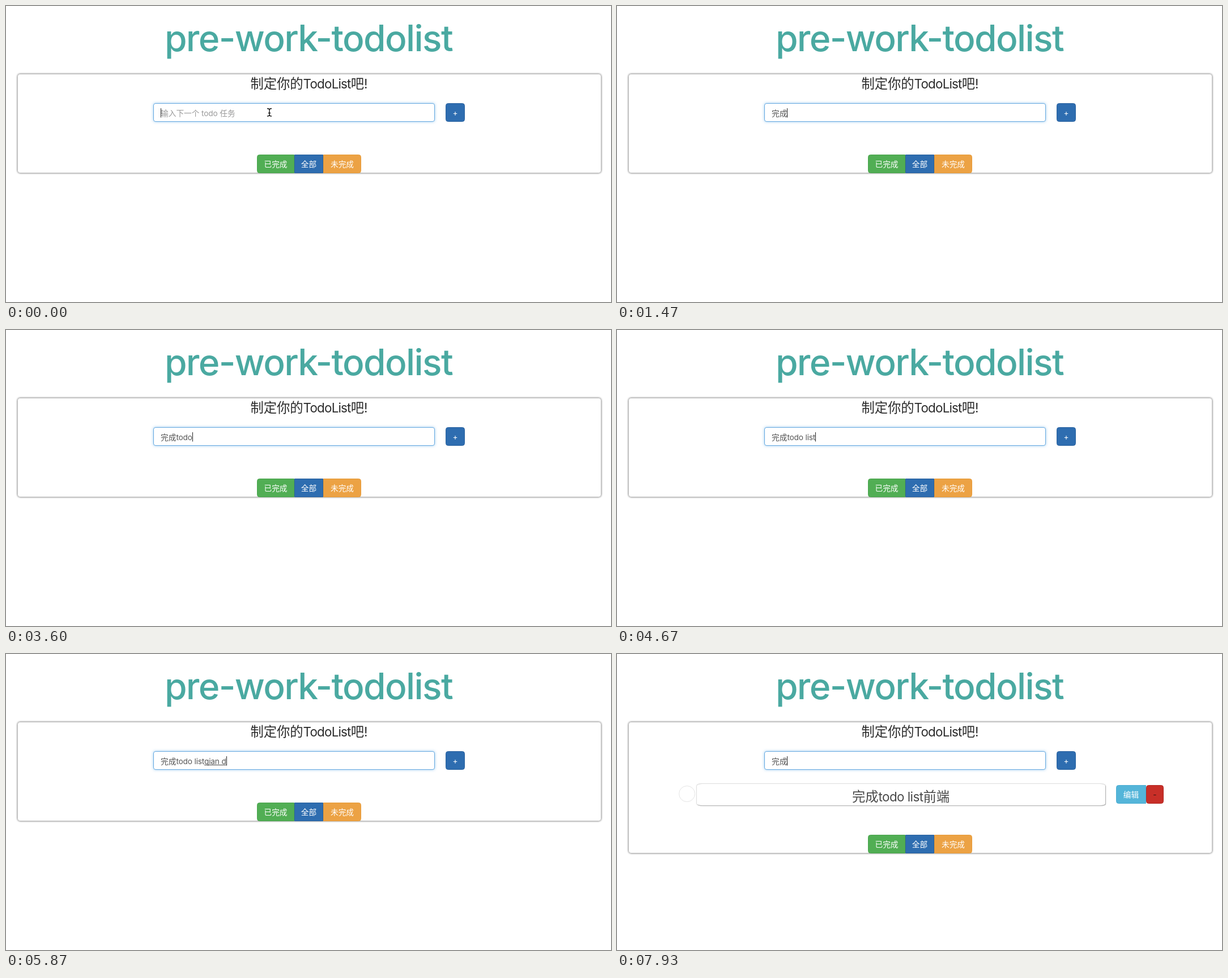
An HTML page that plays this animation: 1068x524 px, repeating every 8000 ms.

```html
<!DOCTYPE html>
<html lang="zh-CN">
<head>
<meta charset="utf-8">
<title>todolist</title>
<style>
html, body { margin: 0; width: 100%; height: 100%; overflow: hidden; background: #fff; }
#stage { position: absolute; left: 0; top: 0; width: 1068px; height: 524px; overflow: hidden; }
#stage div, svg { position: absolute; box-sizing: border-box; }
svg { left: 0; top: 0; }
text {
  font-family: Inter, "Noto Sans CJK SC", "Noto Sans CJK", sans-serif;
  font-size: 13.7px; font-optical-sizing: none; white-space: pre;
}
.latin { letter-spacing: -.013em; }
.mid { text-anchor: middle; }
.title { font-size: 64px; font-weight: 500; fill: #4aa9a1; letter-spacing: -.025em; }
.big { font-size: 23.3px; fill: #2b2b2b; }
.big .latin { font-size: 22.4px; letter-spacing: -.036em; }
.item { fill: #484848; }
.item .latin { letter-spacing: -.025em; }
.num { font-size: 11px; fill: #777; }
.cand { font-size: 16px; fill: #000; }
#panel {
  left: 19.5px; top: 120px; width: 1031px; border-radius: 5px;
  border: 1px solid #c0c0c0; box-shadow: 0 0 3px #666;
}
#input {
  left: 260px; top: 172px; width: 497px; height: 33px; border: 1px solid #66a9e0;
  border-radius: 4px; background: #fff; box-shadow: 0 0 5px rgba(102,175,233,.6);
}
#box {
  left: 141px; top: 230px; width: 721px; height: 38px; border-radius: 9px / 3px;
  box-shadow: 0 0 2px #888, 1px 1px 1px #bbb;
}
#tick { left: 109px; top: 233px; width: 29px; height: 29px; border: 1px solid #e4e4e4; border-radius: 50%; }
#pop {
  left: 0; top: 203px; width: 380px; height: 27px; border-radius: 4px; background: #fff;
  box-shadow: 0 0 1px rgba(0,0,0,.5), 0 4px 10px rgba(0,0,0,.35);
}
#pick { left: 3px; top: 3px; width: 49px; height: 21px; border: 1px solid #b3d3ee; border-radius: 4px; background: #dcebf9; }
</style>
</head>
<body>
<div id="stage">
  <div id="panel"></div>
  <div id="input"></div>
  <div id="box" class="row"></div>
  <div id="tick" class="row"></div>
  <svg id="page" width="1068" height="524">
    <text class="title mid" x="534" y="80">pre-work-todolist</text>
    <text class="big mid" x="534.5" y="146" data-t="制定你的TodoList吧!"></text>
    <g id="add"></g>
    <g id="row" class="row">
      <text class="big item mid" x="501" y="260.5" data-t="完成todo list前端"></text>
    </g>
    <g id="filters"></g>
    <text id="hint" x="273" y="194.5" fill="#999" data-t="输入下一个 todo 任务"></text>
    <text id="value" x="273" y="194.5" fill="#555"></text>
    <path id="under" stroke="#444"/>
    <path id="caret" stroke="#222"/>
    <g id="mouse" fill="none" stroke="#111" stroke-width="1.4">
      <path d="M461 181.5q4 0 4 2.5q0-2.5 4-2.5M461 195q4 0 4-2.5q0 2.5 4 2.5M465 184v9M463 189.5h4"/>
    </g>
  </svg>
  <div id="pop">
    <div id="pick"></div>
    <svg id="cands" width="380" height="27"></svg>
  </div>
</div>
<script>
const $ = id => document.getElementById(id);
const rich = s => s.replace(/[ -~]+/g, m => `<tspan class="latin">${m}</tspan>`);
document.querySelectorAll('[data-t]').forEach(el => el.innerHTML = rich(el.dataset.t));

// Rectangle with chosen rounded ends and a centred label
function button(x, y, w, fill, edge, label, ends = 'lr', ink = '#fff') {
  const l = ends.includes('l') ? 4 : 0, r = ends.includes('r') ? 4 : 0, h = 32;
  const d = `M${x + l + .5} ${y + .5}h${w - l - r - 1}q${r} 0 ${r} ${r}v${h - 2 * r}q0 ${r} ${-r} ${r}` +
    `h${l + r + 1 - w}q${-l} 0 ${-l} ${-l}v${2 * l - h}q0 ${-l} ${l} ${-l}z`;
  return `<path d="${d}" fill="${fill}" stroke="${edge}"/>` +
    `<text class="mid" x="${x + w / 2}" y="${y + 21.5}" fill="${ink}">${label}</text>`;
}
$('add').innerHTML = button(776, 172, 34, '#2e6db0', '#2a629f', '+');
$('row').innerHTML += button(881, 232, 53, '#54b5d9', '#4cadd3', '编辑', 'l') +
  button(934, 232, 31, '#c82f28', '#b12a25', '-', 'lr', '#3a1512');
$('filters').innerHTML = button(443, 263, 66, '#51ae54', '#4aa44e', '已完成', 'l') +
  button(560, 263, 67, '#eca244', '#e89b38', '未完成', 'r') +
  button(509, 263, 51, '#2e6db0', '#2a629f', '全部', '');

const LOOP = 8000, ADDED = 6300;
const WAN = '完成 万 完 晚 玩 碗 弯 湾', TODO = 'todo 头 同 痛 通 透 偷 投';
const LIST = 'list 里 力 李 理 立 离 利', QIAN = '前端 前 钱 千 签 浅 欠 牵';

// [time, committed text, text being composed, candidates]
const steps = [[-300, '', '']];
function type(start, gap, before, word, cands, from = 1) {
  for (let i = 1; i <= word.length; i++)
    steps.push([start + (i - 1) * gap, before, word.slice(0, i), i >= from ? cands : '']);
}
type(300, 110, '', 'wan cheng', WAN, 2);
steps.push([1400, '完成', '']);
type(2000, 140, '完成', 'todo', TODO, 2);
steps.push([3550, '完成todo', ''], [3720, '完成todo ', '']);
type(3850, 100, '完成todo ', 'list', LIST, 2);
steps.push([4400, '完成todo list', '']);
type(5430, 85, '完成todo list', 'qian duan', QIAN, 7);
steps.push([6210, '完成todo list前端', ''], [ADDED, '', '']);
type(7080, 75, '', 'wan cheng', WAN, 2);
steps.push([7790, '完成', '']);

const show = (el, on) => el.style.display = on ? '' : 'none';
const width = s => {
  $('value').innerHTML = rich(s);
  return s ? $('value').getComputedTextLength() : 0;
};
let last = null;

function layout(step) {
  const [, done, comp, cands] = step;
  const x0 = 273 + width(done), x1 = 273 + width(done + comp);
  show($('hint'), !(done + comp));
  show($('under'), comp);
  $('under').setAttribute('d', `M${x0} 196.5H${x1}`);
  $('caret').setAttribute('d', `M${Math.round(x1) + .5} 181v16.5`);
  show($('pop'), cands);
  if (!cands) return;
  $('pop').style.left = Math.round(x0 - 16) + 'px';
  $('cands').innerHTML = cands.split(' ').map((c, i) => {
    const x = i ? 22.5 + 37.6 * i : 5.5;
    return `<text class="num" x="${x}" y="17">${i + 1}</text>` +
      `<text class="cand" x="${x + 9.8}" y="18.8">${rich(c)}</text>`;
  }).join('') + '<path d="M361.5 11l4.5 4.5l4.5-4.5" fill="none" stroke="#888" stroke-width="1.5"/>';
}

function draw(t) {
  const step = steps.filter(s => s[0] <= t).pop();
  if (step !== last) layout(last = step);
  show($('caret'), (t - step[0]) % 1000 < 500);
  show($('mouse'), t < 300);
  const added = t >= ADDED;
  document.querySelectorAll('.row').forEach(el => show(el, added));
  $('filters').setAttribute('transform', `translate(0 ${added ? 57 : 0})`);
  $('panel').style.height = (added ? 233 : 176) + 'px';
}

const begin = performance.now();
function tick() {
  draw((performance.now() - begin) % LOOP);
  requestAnimationFrame(tick);
}
tick();
</script>
</body>
</html>
```
